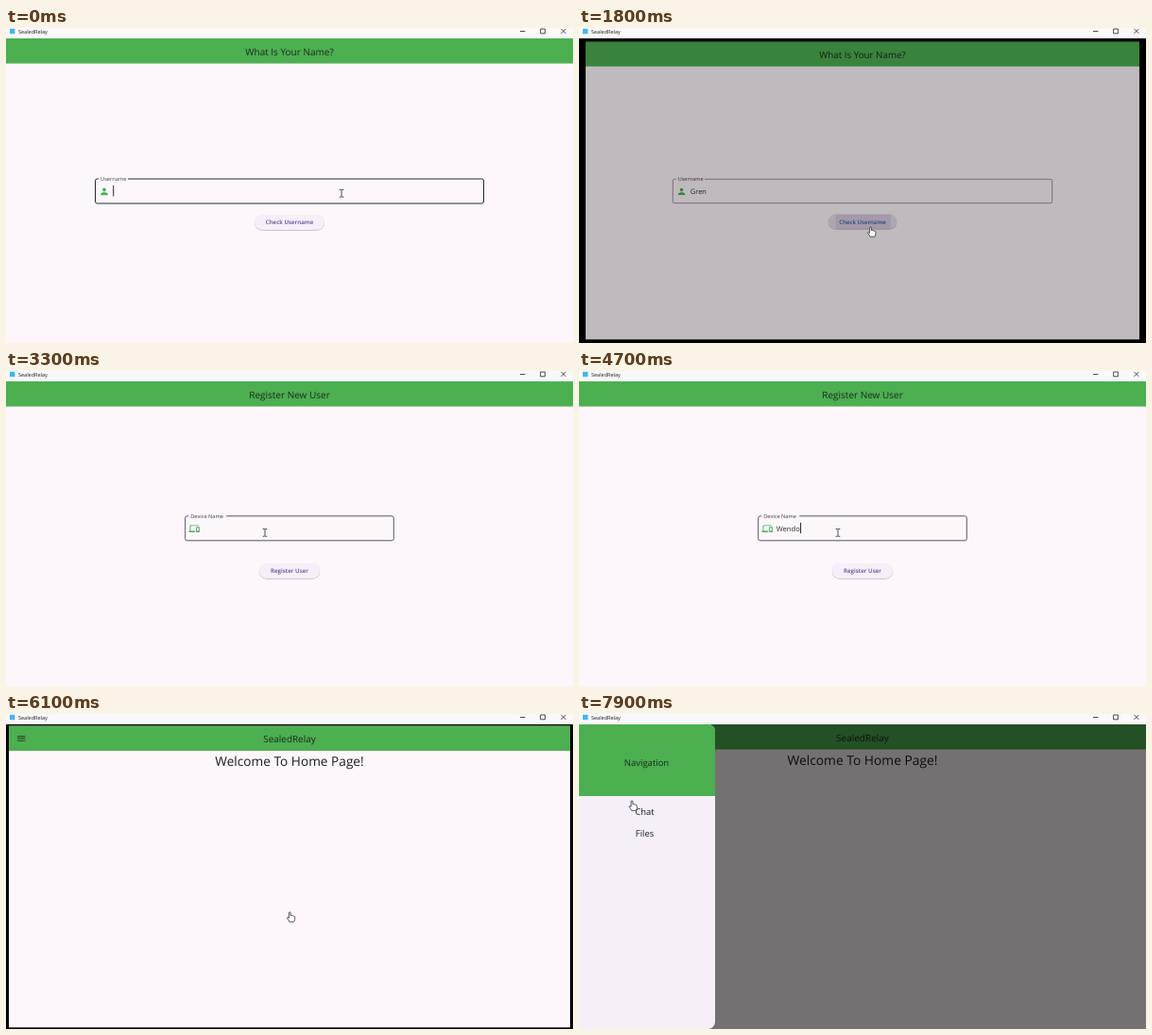
Recreate the animation shown at these times as an HTML page. Size 600x334 px, loop 8000 ms.

```html
<!DOCTYPE html>
<html lang="en">
<head>
<meta charset="utf-8">
<title>SealedRelay</title>
<style>
html, body { margin: 0; width: 100%; height: 100%; overflow: hidden; background: #000; }
svg { display: block; width: 600px; height: 334px; }
text { font-family: "Open Sans", "Noto Sans", sans-serif; text-rendering: geometricPrecision; white-space: pre; }
</style>
</head>
<body>
<svg id="stage" viewBox="0 0 600 334"></svg>
<script>
const LOOP = 8000, GREEN = '#4caf50', PAPER = '#fdf7fc', INK = '#1d2a20';
const APP = 'SealedRelay';
const ICONS = {
  person: 'M12 12c2.2 0 4-1.8 4-4s-1.8-4-4-4-4 1.8-4 4 1.8 4 4 4zm0 2c-2.7 0-8 1.3-8 4v2h16v-2c0-2.7-5.3-4-8-4z',
  devices: 'M4 6h18V4H4c-1.1 0-2 .9-2 2v11H0v3h14v-3H4V6zm19 2h-6c-.6 0-1 .4-1 1v10c0 .6.4 1 1 1h6c.6 0 1-.4 1-1V9c0-.6-.4-1-1-1zm-1 9h-4v-7h4v7z',
  menu: 'M3 18h18v-2H3v2zm0-5h18v-2H3v2zm0-7v2h18V6H3z'
};

const text = (x, y, size, str, fill, more = '') =>
  `<text x="${x}" y="${y}" font-size="${size}" fill="${fill}" ${more}>${str}</text>`;
const mid = (x, y, size, str, fill, more = '') =>
  text(x, y, size, str, fill, 'text-anchor="middle" ' + more);
const rect = (x, y, w, h, fill, more = '') =>
  `<rect x="${x}" y="${y}" width="${w}" height="${h}" fill="${fill}" ${more}/>`;
const icon = (name, cx, cy, fill) =>
  `<path d="${ICONS[name]}" fill="${fill}" transform="translate(${cx} ${cy}) scale(.473) translate(-12 -12)"/>`;

const page = (id, title, body) => `<g id="${id}">
  ${rect(0, 11, 600, 323, PAPER)}${rect(0, 11, 600, 26.6, GREEN)}
  ${mid(300, 28.5, 10, title, INK)}${body}</g>`;

const field = (id, x, y, w, glyph, label, gap) => `
  <rect id="${id}Box" x="${x}" y="${y}" width="${w}" height="26" rx="2" fill="none"/>
  <rect id="${id}Gap" x="${x + 3.5}" y="${y - 1}" width="${gap}" height="2" fill="${PAPER}"/>
  ${icon(glyph, x + 9.5, y + 13.4, GREEN)}
  <text id="${id}Label" fill="#4a4752">${label}</text>
  <text id="${id}Text" x="${x + 19}" y="${y + 16.1}" font-size="7.6" fill="#2b2930"></text>
  <rect id="${id}Caret" y="${y + 7}" width="1" height="11.4" fill="#29272e"/>`;

const button = (id, cy, w, label) => {
  const x = 300 - w / 2, y = cy - 8;
  return `<clipPath id="${id}Clip">${rect(x, y, w, 16, '#000', 'rx="8"')}</clipPath>
  ${rect(x - .3, y + .2, w + .6, 16.5, '#000', 'rx="8.2" opacity=".1"')}
  ${rect(x, y + .9, w, 16, '#000', 'rx="8" opacity=".13"')}
  <rect id="${id}Body" x="${x}" y="${y}" width="${w}" height="16" rx="8"/>
  <rect id="${id}Splash" y="${y}" height="16" rx="2" fill="#b98cc8" opacity=".26" clip-path="url(#${id}Clip)"/>
  ${mid(300, cy + 2.4, 6.2, label, '#5b4a8c', `id="${id}Label" font-weight="600"`)}`;
};

const stage = document.getElementById('stage');
stage.innerHTML = rect(0, 0, 600, 334, '#000') +
  page('ask', 'What Is Your Name?',
    field('user', 94.5, 160, 411, 'person', 'Username', 31) + button('check', 206, 74, 'Check Username')) +
  page('join', 'Register New User',
    field('device', 189.7, 153.8, 220.6, 'devices', 'Device Name', 40) + button('reg', 212, 64, 'Register User')) +
  page('home', APP,
    `<circle id="menuHover" cx="13.2" cy="24.4" r="9.4" fill="#000" opacity=".08"/>` +
    icon('menu', 13.2, 24.5, '#1f3522') + mid(300, 53.7, 13.8, 'Welcome To Home Page!', '#1d1b20')) +
  rect(0, 11, 600, 323, '#000', 'id="scrim"') +
  `<g id="drawer">
    <clipPath id="drawerClip">${rect(-20, 11, 164, 323, '#000', 'rx="7.6"')}</clipPath>
    <g clip-path="url(#drawerClip)">${rect(0, 11, 144, 323, '#f5f0f8')}${rect(0, 11, 144, 76, GREEN)}</g>
    ${mid(71.5, 54.8, 9.5, 'Navigation', INK)}
    ${mid(69.5, 106.5, 9.4, 'Chat', '#1d1b20')}${mid(69.5, 129.5, 9.4, 'Files', '#1d1b20')}
  </g>` +
  rect(0, 0, 600, 11, '#f9f8fa') + rect(4, .8, 5.4, 5.4, '#46b4ec') +
  text(13, 5.5, 5.5, APP, '#1a1a1a') +
  `<path d="M544 3.5h5.4M565.6 1h4.8v4.8h-4.8zM587.4 .9l5 5M592.4 .9l-5 5" fill="none" stroke="#222" stroke-width=".8"/>
  <path id="beam" d="M-2.3 -3.9H-.5L0 -3.4L.5 -3.9H2.3M0 -3.4V3.4M-2.3 3.9H-.5L0 3.4L.5 3.9H2.3" fill="none" stroke="#222" stroke-width=".8"/>
  <path id="arrow" d="M0 0V7L1.6 5.5L2.7 8L3.9 7.5L2.8 5.1H5.1Z" fill="#000" stroke="#fff" stroke-width=".4"/>
  <path id="hand" d="M-.9 .8Q-.9 0 0 0T.9 .8V3.6Q2 3.2 2.6 3.9Q3.6 3.6 4.1 4.3Q5.4 4.2 5.4 5.4V7.4Q5.3 9 4.3 10.4H-.3Q-1.2 8.4 -2.8 6.6Q-3 5.3 -1.7 5.7L-.9 6.4Z" fill="#fff" stroke="#222" stroke-width=".75" stroke-linejoin="round"/>`;

const el = {};
stage.querySelectorAll('[id]').forEach(n => el[n.id] = n);
const set = (id, attrs) => { for (const k in attrs) el[id].setAttribute(k, attrs[k]); };
const show = (id, on) => set(id, { visibility: on ? 'visible' : 'hidden' });
const clamp = v => Math.max(0, Math.min(1, v));
const ramp = (t, a, b) => clamp((t - a) / (b - a));
const ease = u => u * u * (3 - 2 * u);

const TO_JOIN = 1767, TO_HOME = 5946, OPEN = 7506;
const NAME = { word: 'Gren', keys: [200, 500, 700, 1000], start: -100 };
const DEVICE = { word: 'Wendora', keys: [3800, 4000, 4200, 4500, 4700, 4800, 5000], start: 2800 };

// start, end, x, y of each pointer move
const MOVES = [
  [0, 0, 355, 175.3], [1300, 1700, 308.5, 211], [2200, 2750, 274, 171.4],
  [5300, 5750, 300.3, 210], [6200, 7250, 13.3, 29], [7650, 7890, 56, 92]
];

function pointer(t) {
  let [, , x, y] = MOVES[0];
  for (const [a, b, mx, my] of MOVES.slice(1)) {
    const k = ease(ramp(t, a, b));
    x += (mx - x) * k;
    y += (my - y) * k;
  }
  return [x, y];
}

function drawPage(id, t, enter, leave) {
  const zoom = p => p < 1 / 6 ? .4 * Math.pow(p * 6, 1.4) : 1 - .6 * Math.pow(1 - (p - 1 / 6) * 1.2, 4);
  const pin = ramp(t, enter, enter + 300), pout = ramp(t, leave, leave + 300);
  const s = (.85 + .15 * zoom(pin)) * (1 - .1 * zoom(pout));
  const alpha = ramp(pin, .125, .25) * (1 - ramp(pout, .0825, .2075));
  set(id, { transform: `translate(300 172.5) scale(${s}) translate(-300 -172.5)`, opacity: alpha });
  show(id, alpha > 0);
}

function drawField(id, t, input, x, y, focused, float, color) {
  const n = input.keys.filter(k => t >= k).length;
  const last = n ? input.keys[n - 1] : input.start;
  el[id + 'Text'].textContent = input.word.slice(0, n);
  const end = x + 19 + (n ? el[id + 'Text'].getComputedTextLength() + .3 : -.3);
  set(id + 'Caret', { x: end, opacity: focused && Math.floor((t - last) / 500) % 2 === 0 ? 1 : 0 });
  set(id + 'Box', { stroke: focused ? color : '#6d6872', 'stroke-width': focused ? 1 : .7 });
  set(id + 'Gap', { opacity: float > .3 ? 1 : 0 });
  set(id + 'Label', { x: x + 19 - 13.5 * float, y: y + 16.1 - 13.9 * float, 'font-size': 7.6 - 1.9 * float });
}

function drawButton(id, dt, hover) {
  const w = dt < -93 ? 0 : 22 + (dt + 46) * .47;
  set(id + 'Body', { fill: hover ? '#e6dfe9' : '#f5eff9' });
  set(id + 'Splash', { x: 300.7 - w / 2, width: Math.max(0, w) });
  set(id + 'Label', { fill: dt > -20 ? '#2f5fae' : '#5b4a8c' });
}

function render(t) {
  const [x, y] = pointer(t);
  const over = (l, top, r, b) => x > l && x < r && y > top && y < b;
  const onAsk = t < TO_JOIN + 50, onJoin = !onAsk && t < TO_HOME + 50, onHome = !onAsk && !onJoin;
  const onCheck = onAsk && over(263, 198, 337, 214);
  const onReg = onJoin && over(268, 204, 332, 220);
  const onMenu = onHome && t < OPEN && over(3, 14, 23, 34);

  drawPage('ask', t, -1000, TO_JOIN);
  drawPage('join', t, TO_JOIN, TO_HOME);
  drawPage('home', t, TO_HOME, LOOP + 1000);
  drawField('user', t, NAME, 94.5, 160, t < 1700, 1, '#2b2a33');
  drawField('device', t, DEVICE, 189.7, 153.8, t >= 2800, ease(ramp(t, 2800, 2967)), '#55506a');
  drawButton('check', t - TO_JOIN, onCheck);
  drawButton('reg', t - TO_HOME, onReg);
  show('menuHover', onMenu);

  const open = ramp(t, OPEN, OPEN + 246);
  set('scrim', { opacity: .54 * open });
  set('drawer', { transform: `translate(${144 * (open - 1)} 0)` });
  show('drawer', open > 0);

  const beam = onAsk && over(94, 160, 506, 186) || onJoin && over(189, 153, 411, 180);
  const hand = onCheck || onReg || onMenu || onHome && t < 6220 || open === 1 && over(0, 90, 144, 138);
  const kind = beam ? 'beam' : hand ? 'hand' : 'arrow';
  for (const c of ['beam', 'arrow', 'hand']) {
    set(c, { transform: `translate(${x} ${y})`, display: c === kind ? 'inline' : 'none' });
  }
}

const began = performance.now();
function tick() {
  render((performance.now() - began) % LOOP);
  requestAnimationFrame(tick);
}
tick();
</script>
</body>
</html>
```
